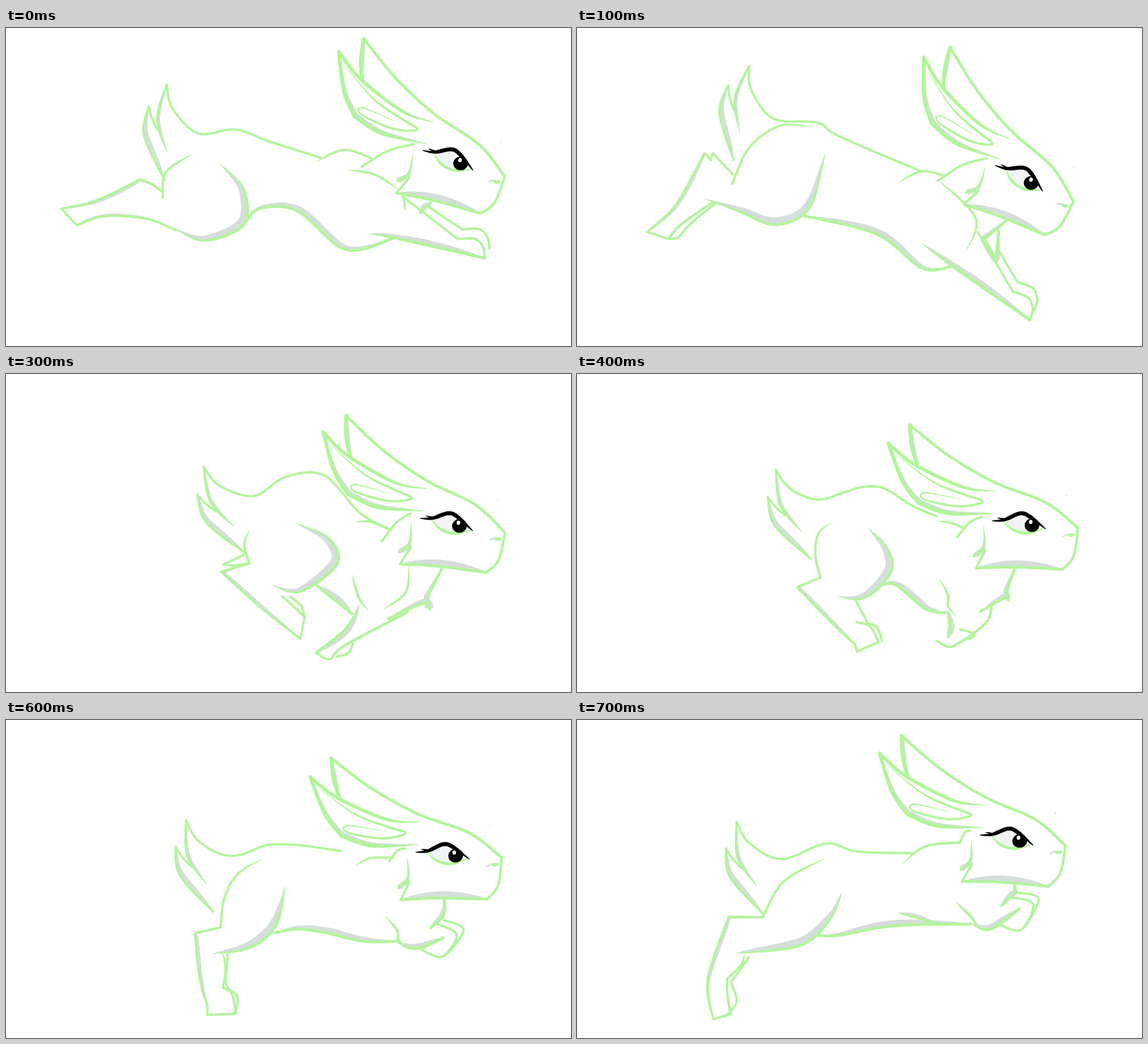
These frames come from a looping animation (998x561 px, 800 ms). An HTML page with a canvas:

```html
<!DOCTYPE html>
<html lang="en">
<head>
<meta charset="utf-8">
<title>Running rabbit</title>
<style>
html, body { margin: 0; width: 100%; height: 100%; overflow: hidden; background: #fff; }
canvas { display: block; }
</style>
</head>
<body>
<canvas id="stage" width="998" height="561"></canvas>
<script>
const ctx = document.getElementById('stage').getContext('2d');
const GREEN = '#b2f59b', GREY = '#d6dedb';
const STEP = 100;
const START = 1, END = 2, BOTH = 3;

// Per line: tapered ends, shade depth to the left of travel, width
const STYLE = {
  shoulder: [START], throat: [BOTH], rump: [START], fur: [END], cheek: [START, 5], legback: [START],
  top: [0, -6], leg: [0, 6], sole: [0, 4], foot: [0, 3], thigh: [BOTH, 13, 5], flank: [START, 6],
  belly: [0, 10, 5], elbow: [BOTH, 3], arm: [START, 9, 5.4], fist: [0, 3], farfist: [0, 2], chest: [0, -8, 5],
  earFar: [0, -6, 7], brow: [0, 0, 5], muzzle: [0, 0, 4.6], jaw: [0, -12, 5],
  earOut: [END, 7, 6.6], earTop: [END, 0, 6], earIn: [BOTH],
  tailOut: [0, 9], tailLeft: [END, 5]
};

// Rigid parts; a slash marks a corner
const HEAD = {
  earFar: '629,90 627,56 632,19',
  brow: '632,19 688,88 757,152 836,206 881,262',
  muzzle: '881,262 863,308 838,327',
  jaw: '838,327 755,304 690,291',
  cheek: '719,222 711,256 691,270/711,263 690,291',
  earOut: '588,42 597,112 616,156/664,186 743,204',
  earTop: '588,42 625,89 700,147 755,166',
  earIn: '598,66 650,126 700,161 727,179 685,178 628,153 631,141 690,166'
};
const TAIL = {
  tailOut: '252,139 244,190 280,268',
  tailIn: '252,139 258,160 268,180',
  tailLeft: '284,100 267,160 284,219'
};
const TAIL_EDGE = '284,100 294,142 340,186';
const NAPE = '720,205';
const PAW = '0,0 5,-20 -3,-39 -30,-50';
const EYE = [803, 239], TAIL_TIP = [284, 100], FAR_PAW = [8, -17];

// head, tail, paw: [x, y, degrees]
const STRETCH = {
  head: [803, 239, 0], tail: [284, 100, 0], paw: [846, 406, -24], elbows: '700,297 747,316', neck: '628,245',
  back: '405,179 465,200 556,229',
  lines: {
    shoulder: '547,236 597,215 646,230',
    throat: '603,251 650,258 694,285',
    rump: '328,223 282,255 277,300',
    top: '98,319 160,304 237,267/255,274 275,288',
    sole: '98,319 125,348/175,332 250,337 300,357',
    thigh: '296,353 350,375 420,347 420,285 379,240',
    belly: '422,343 450,318 515,323 600,391 684,371',
    arm: '642,363 690,371 846,406',
    chest: '750,308 732,326',
    fur: '702,298 705,322'
  }
};
const REACH = {
  head: [802.2, 273.5, 7], tail: [304, 67, 8], paw: [800, 515, 0], elbows: '708,360 742,388', neck: '637,270',
  back: '425,167 463,191 608,253',
  lines: {
    shoulder: '569,272 608,253 648,260',
    throat: '637,267 704,335 687,394',
    rump: '418,175 360,172 305,210 274,275',
    hock: '276,259 240,221/236,232',
    leg: '237,233 225,221/175,311 124,360',
    foot: '124,360 162,372/185,346 242,306',
    farfoot: '162,372 178,371/203,343 245,309',
    thigh: '226,302 290,325 350,347 410,318 439,221',
    belly: '400,331 530,364 610,424 663,420',
    arm: '610,381 680,432 800,515',
    chest: '757,341 720,372/740,408/745,358'
  }
};
const LAND = {
  head: [810.5, 276.3, -8], tail: [330, 102, -3], paw: [745, 535, 0], elbows: '700,428 714,425', neck: '655,284',
  back: '460,175 545,219 622,271',
  lines: {
    shoulder: '574,288 615,271 656,283',
    throat: '678,290 714,365 682,418',
    rump: '372,201 335,260 339,292',
    hock: '334,284 318,285/338,292/307,297',
    leg: '307,297 345,360 381,461',
    foot: '381,461 408,428/388,390 388,358',
    farfoot: '394,360 392,385 412,417/406,430',
    thigh: '353,318 410,362 490,320 475,248 405,198',
    belly: '448,357 500,382 530,377 600,433 652,443',
    arm: '612,379 652,440 685,490 745,535',
    chest: '776,351 738,402/739,427/703,428'
  }
};
const GATHER = {
  head: [801, 268, -8], tail: [349, 164, -27], neck: '664,295',
  back: '495,181 562,179 625,245 680,275',
  lines: {
    shoulder: '616,261 645,261 679,275',
    throat: '712,338 706,385 667,415',
    rump: '430,276 421,300 430,335',
    hock: '420,319 384,336/400,338 430,334',
    leg: '430,334 380,349/450,412 520,467',
    foot: '520,467 528,428/488,392',
    farfoot: '503,393 522,409/528,428',
    thigh: '470,373 520,384 585,335 570,290 513,263',
    belly: '550,374 611,423',
    elbow: '611,354 623,395 639,417',
    arm: '624,408 600,450 548,492',
    fist: '548,492 572,503 597,480 710,420',
    farfist: '584,499 605,492 613,475',
    chest: '770,343 745,393/748,415/738,404 675,432'
  }
};
const PUSH = {
  head: [806.5, 265.3, -17.7], tail: [354, 174, -18.4], neck: '679,281',
  back: '475,225 520,208 590,227',
  lines: {
    shoulder: '662,259 692,270',
    rump: '468,247 430,272 419,330 430,384',
    leg: '430,384 397,403/475,497/470,513',
    foot: '470,513 543,522/532,485 500,484',
    legback: '468,405 490,445 502,484',
    farfoot: '480,403 501,455 508,474/537,477 549,514',
    thigh: '452,413 500,402 527,350 518,282',
    belly: '527,370 565,361 635,418 690,420',
    elbow: '671,372 692,400 684,419 700,436',
    arm: '684,425 725,441 764,435',
    fist: '722,449 757,466 787,434 755,405',
    farfist: '770,402 801,424 770,460',
    chest: '776,345 775,385/750,406'
  }
};
const LEAP = {
  head: [782, 213.3, -10.5], tail: [282, 180, -17.4], neck: '676,217',
  back: '440,218 495,232 592,235',
  lines: {
    shoulder: '575,253 615,223 675,216',
    rump: '438,244 365,285 328,348',
    leg: '328,348 268,347/231,457 241,528',
    foot: '241,528 272,518/266,485 265,460',
    legback: '296,412 290,432 265,457',
    farfoot: '304,418 272,463/282,497 262,523',
    thigh: '280,412 395,397 448,350 468,304',
    belly: '424,380 462,380 560,363 694,360',
    flank: '568,340 630,357',
    elbow: '670,322 696,348 712,369',
    arm: '694,358 730,369 781,333',
    fist: '747,362 785,370 806,325 762,312',
    farfist: '776,304 815,315 795,360',
    chest: '772,289 776,304/750,327'
  }
};

const points = text => text.split(' ').map(p => p.split(',').map(Number));
const mid = (a, b) => a.map((v, i) => (v + b[i]) / 2);
const mapValues = (obj, fn) => Object.fromEntries(Object.entries(obj).map(([k, v]) => [k, fn(v, k)]));

function place(pts, [x, y, deg], [px, py] = [0, 0]) {
  const c = Math.cos(deg * Math.PI / 180), s = Math.sin(deg * Math.PI / 180);
  return pts.map(([u, v]) => [x + (u - px) * c - (v - py) * s, y + (u - px) * s + (v - py) * c]);
}

// Smooth curve through each part; parts meet in corners
function curve(parts) {
  const out = [];
  let last = null;
  for (const part of parts) {
    const pts = last ? [last, ...part] : part;
    last = pts[pts.length - 1];
    for (let i = 0; i < pts.length - 1; i++) {
      const b = pts[i], c = pts[i + 1], a = pts[i - 1] || b, d = pts[i + 2] || c;
      const n = Math.max(3, Math.ceil(Math.hypot(c[0] - b[0], c[1] - b[1]) / 4));
      for (let k = 0; k < n; k++) {
        const t = k / n;
        out.push([0, 1].map(j => b[j] + t / 2 * (c[j] - a[j] +
          t * (2 * a[j] - 5 * b[j] + 4 * c[j] - d[j] + t * (3 * b[j] - a[j] - 3 * c[j] + d[j])))));
      }
    }
  }
  out.push(last);
  return out;
}
const trace = text => curve(text.split('/').map(points));

// The back runs on from the tail, the neck ends at the nape, both paws share one shape
function build({ head, tail, paw, elbows, neck, back, lines }) {
  const body = mapValues(lines, trace);
  body.back = curve([[...place(points(TAIL_EDGE), tail, TAIL_TIP), ...points(back)]]);
  const [base] = points(neck), [nape] = place(points(NAPE), head, EYE);
  const [mx, my] = mid(base, nape);
  body.shoulder2 = curve([[base, [mx, my - 8], nape]]);
  if (paw) points(elbows).forEach((elbow, far) => {
    const [x, y, deg] = paw;
    const tip = [x + far * FAR_PAW[0], y + far * FAR_PAW[1], deg];
    body['paw' + far] = curve([place(points(PAW), tip), [elbow]]);
  });
  return { head, tail, body };
}

function between(a, b) {
  const body = {};
  for (const key in a.body) {
    const from = a.body[key], to = b.body[key];
    if (to) body[key] = from.map((p, i) =>
      mid(p, to[Math.round(i / (from.length - 1) * (to.length - 1))]));
  }
  return { head: mid(a.head, b.head), tail: mid(a.tail, b.tail), body };
}

const [stretch, reach, land, gather, push, leap] = [STRETCH, REACH, LAND, GATHER, PUSH, LEAP].map(build);
const POSES = [stretch, reach, land, gather, between(gather, push), push, between(push, leap), leap];

function normal(a, b) {
  const dx = b[0] - a[0], dy = b[1] - a[1], len = Math.hypot(dx, dy) || 1;
  return [dy / len, -dx / len];
}

function fill(pts, color) {
  ctx.beginPath();
  pts.forEach(p => ctx.lineTo(p[0], p[1]));
  ctx.fillStyle = color;
  ctx.fill();
}

function shade(pts, depth) {
  const end = pts.length - 1;
  const edge = pts.map((p, i) => {
    const n = normal(pts[Math.max(0, i - 2)], pts[Math.min(end, i + 2)]);
    const h = depth * Math.sin(Math.PI * i / end);
    return [p[0] + n[0] * h, p[1] + n[1] * h];
  });
  fill(pts.concat(edge.reverse()), GREY);
}

function ink(pts, width, taper, color = GREEN) {
  const end = pts.length - 1;
  const radius = i => {
    const head = taper & START ? 0.15 + i / end * 2.8 : 1;
    const tail = taper & END ? 0.15 + (1 - i / end) * 2.8 : 1;
    return width / 2 * Math.min(1, head, tail);
  };
  ctx.beginPath();
  pts.forEach((p, i) => {
    const r = radius(i);
    ctx.moveTo(p[0] + r, p[1]);
    ctx.arc(p[0], p[1], r, 0, Math.PI * 2, true);
    if (i === end) return;
    const q = pts[i + 1], s = radius(i + 1), [x, y] = normal(p, q);
    ctx.moveTo(p[0] - x * r, p[1] - y * r);
    ctx.lineTo(q[0] - x * s, q[1] - y * s);
    ctx.lineTo(q[0] + x * s, q[1] + y * s);
    ctx.lineTo(p[0] + x * r, p[1] + y * r);
    ctx.closePath();
  });
  ctx.fillStyle = color;
  ctx.fill();
}

function drawLines(lines) {
  const style = key => STYLE[key] || [];
  for (const key in lines) {
    const [, depth = 0] = style(key);
    if (depth) shade(lines[key], depth);
  }
  for (const key in lines) {
    const [taper = 0, , width = 4.1] = style(key);
    ink(lines[key], width, taper);
  }
}

function oval(x, y, rx, ry, color, turn = 0) {
  ctx.beginPath();
  ctx.ellipse(x, y, rx, ry, turn, 0, Math.PI * 2);
  ctx.fillStyle = color;
  ctx.fill();
}

function drawFace() {
  const lid = trace('755,220 768,239 792,251 823,249');
  const lash = trace('736,216 757,219 787,214 803,224 825,251');
  fill(lid.concat(lash.slice(6).reverse()), '#f1f3f4');
  ink(lid, 5, BOTH);
  oval(...EYE, 13, 12, '#000');
  oval(802, 233, 3.2, 3.8, '#f4f4f4', 0.3);
  ink(lash, 7, BOTH, '#000');
  ink(trace('746,213 762,219'), 2.4, START, '#000');
  ink(trace('850,272 859,269 870,270'), 3, START, GREY);
  oval(867, 271.5, 6.5, 3.2, GREEN, 0.1);
  oval(874, 202, 0.8, 0.8, '#aaa');
}

function drawPart([x, y, deg], [px, py], draw) {
  ctx.save();
  ctx.translate(x, y);
  ctx.rotate(deg * Math.PI / 180);
  ctx.translate(-px, -py);
  draw();
  ctx.restore();
}

const headLines = mapValues(HEAD, trace), tailLines = mapValues(TAIL, trace);

function drawPose({ head, tail, body }) {
  ctx.clearRect(0, 0, 998, 561);
  drawLines(body);
  drawPart(tail, TAIL_TIP, () => drawLines(tailLines));
  drawPart(head, EYE, () => { drawLines(headLines); drawFace(); });
}

let shown = -1;
function tick() {
  const index = Math.floor(performance.now() / STEP) % POSES.length;
  if (index !== shown) drawPose(POSES[shown = index]);
  requestAnimationFrame(tick);
}
tick();
</script>
</body>
</html>
```
